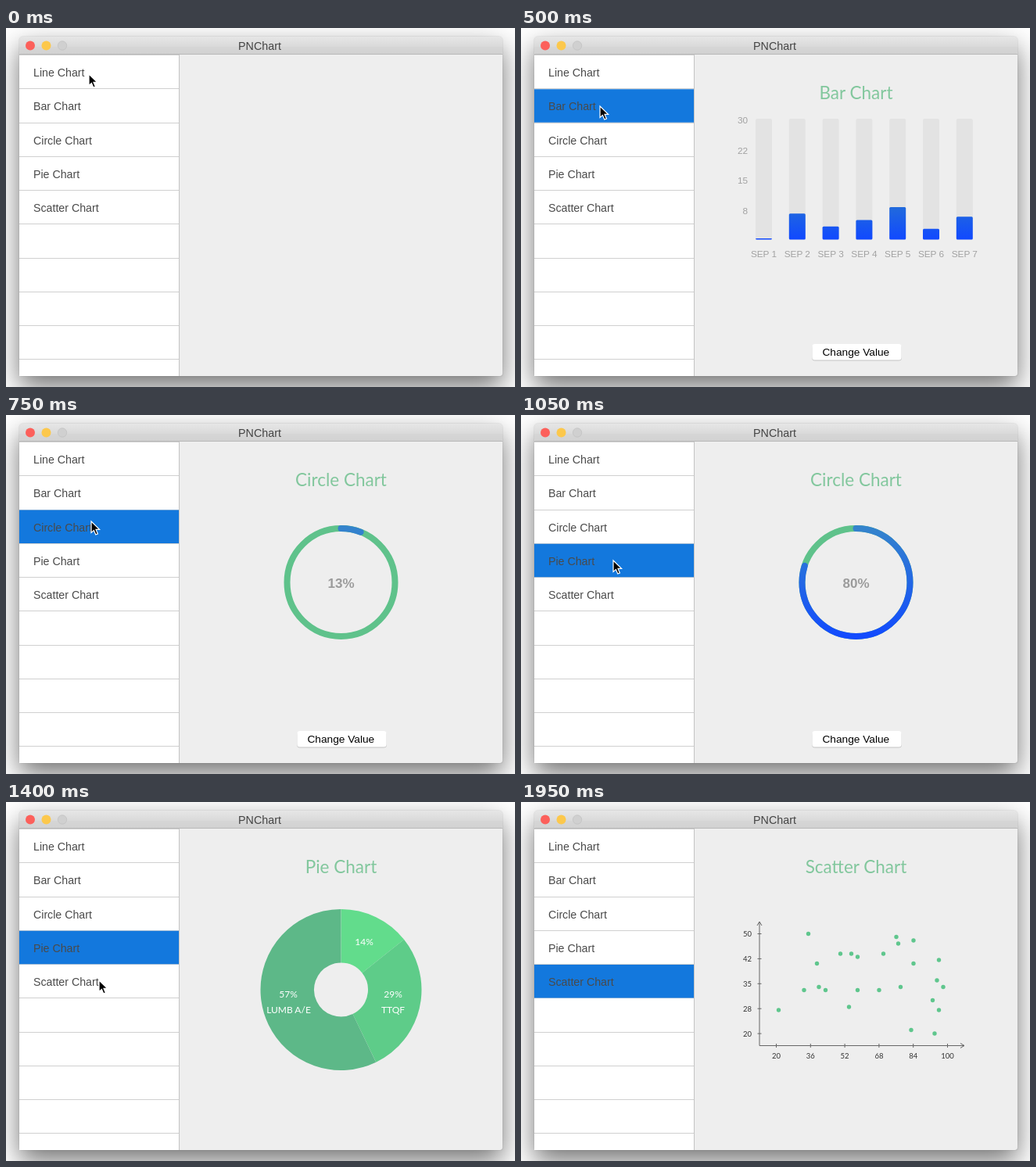
Write an HTML page that moves like this. It is 651x459 px and loops after 2000 ms.

```html
<!DOCTYPE html>
<html lang="en">
<head>
<meta charset="utf-8">
<title>PNChart</title>
<style>
  html, body { margin: 0; width: 100%; height: 100%; overflow: hidden; background: #fff; }
  #window {
    position: absolute; left: 17px; top: 11px; width: 618px; height: 434px;
    border-radius: 5px 5px 3px 3px; background: #eee;
    box-shadow: 0 0 1px rgba(0,0,0,.5), 0 14px 34px rgba(0,0,0,.55);
  }
  svg { position: absolute; left: 0; top: 0; }
  text { font-family: "Liberation Sans", Arial, sans-serif; }
  .lato, .title { font-family: Lato, sans-serif; }
  .title { font-size: 22.5px; fill: #82c79d; }
  .row { font-size: 14.2px; fill: #4a4a4a; }
  .bold { font-size: 10.9px; stroke: #000; stroke-width: .3; }
  .pale { font-size: 11.8px; fill: #a2a2a2; }
  .tiny { font-size: 9.5px; fill: #333; }
  .pie { font-size: 12px; fill: #fff; }
  .axis { fill: none; stroke: #666; }
</style>
</head>
<body>
<div id="window"></div>
<svg id="stage" width="651" height="459" viewBox="0 0 651 459"></svg>
<script>
const NAMES = ['Line', 'Bar', 'Circle', 'Pie', 'Scatter'];
const ROW = 43.25, MID = 428.5;
const SELECT = [50, 400, 600, 1050, 1550];   // row clicks; each chart follows 50 ms later
const BARS = [1, 24, 12, 18, 30, 10, 21];
const SERIES = [
  { color: '#c9dfd3', data: [60.1, 160.1, 126.4, 262.2, 186.2, 127.2, 176.2] },
  { color: '#7ccbf0', data: [20.1, 180.1, 26.4, 202.2, 126.2, 167.2, 276.2] }
];
const DOTS = [
  [329.5, 266], [362, 240.5], [367.5, 168.5], [378.5, 206.5], [381, 236.5], [389.5, 240.5],
  [408.5, 194], [419.5, 262], [422.5, 194], [430.5, 198], [430.5, 240.5], [458, 240.5],
  [463.5, 194], [480, 172.5], [482.5, 181], [485.5, 236.5], [502, 177], [502, 206.5],
  [499, 291.5], [526.5, 253.5], [529, 296], [532, 228], [534.5, 202], [534.5, 266], [540, 236.5]
];
const POINTER = [   // time, x, y
  [0, 106, 59], [50, 92, 54], [200, 82, 52], [300, 88, 65], [400, 98, 93], [500, 101, 100],
  [600, 107, 130], [750, 109, 136], [900, 111, 145], [1050, 118, 186], [1250, 119, 200],
  [1400, 119, 228], [1550, 115, 230], [1750, 112, 230]
];

const $ = id => document.getElementById(id);
const clamp = v => Math.max(0, Math.min(1, v));
const ease = p => p * p * (3 - 2 * p);
const phase = (t, start, length) => clamp((t - start) / length);
const repeat = (n, f) => Array.from({ length: n }, (_, i) => f(i)).join('');
const text = (x, y, s, cls, anchor = 'middle', more = '') =>
  `<text x="${x}" y="${y}" class="${cls}" text-anchor="${anchor}" ${more}>${s}</text>`;
const rect = (x, y, w, h, fill, more = '') =>
  `<rect x="${x}" y="${y}" width="${w}" height="${h}" fill="${fill}" ${more}/>`;
const circle = (x, y, r, fill, more = '') =>
  `<circle cx="${x}" cy="${y}" r="${r}" fill="${fill}" ${more}/>`;
const path = (d, more) => `<path d="${d}" ${more}/>`;
const axes = (x, y, top, right) => path(
  `M${x - 3} ${top + 5}L${x} ${top}L${x + 3} ${top + 5}M${x} ${top}V${y}H${right}` +
  `M${right - 5} ${y - 3}L${right} ${y}L${right - 5} ${y + 3}`, 'class="axis"');

function frame() {
  return rect(17, 11, 618, 23, 'url(#bar)', 'rx="4"') +
    rect(17, 24, 618, 10, '#d4d4d4', 'opacity=".5"') + rect(17, 33, 618, 1, '#b8b8b8') +
    circle(31, 22.5, 6, '#fc605b') + circle(51.5, 22.5, 6, '#fcc84c') +
    circle(72, 22.5, 5.7, '#d0d0d0', 'stroke="#bfbfbf" stroke-width=".7"') +
    text(324.5, 27.7, 'PNChart', '', 'middle', 'font-size="14.3" fill="#444"') +
    rect(17, 34, 205, 411, '#fff') + rect(221, 34, 1, 411, '#c4c4c4') +
    repeat(10, i => rect(17, Math.round(34 + ROW * i), 204, 1, '#d0d0d0')) +
    `<g id="mark">${rect(17, 35, 204, 42.5, '#1378dd')}</g>` +
    NAMES.map((n, i) => text(35, 62 + ROW * i, n + ' Chart', 'row', 'start')).join('');
}

const px = i => 325.5 + 41.2 * i, py = v => 277.2 - .2485 * v;

function lineChart() {
  const marker = (s, x, y) => s
    ? `M${x - 4} ${y + 4}h8v-8h-8z` : `M${x - 4} ${y - 3.5}h8l-4 7z`;
  const series = ({ color, data }, s) => {
    let d = '';
    for (let i = 0; i < 6; i++) {
      const dx = 41.2, dy = py(data[i + 1]) - py(data[i]), k = 4.5 / Math.hypot(dx, dy);
      d += `M${px(i) + dx * k} ${py(data[i]) + dy * k}` +
        `L${px(i + 1) - dx * k} ${py(data[i + 1]) - dy * k}`;
    }
    const look = `fill="none" stroke="${color}" stroke-width="2" pathLength="1"`;
    return path(d, look + ' class="trace"') +
      data.map((v, i) => path(marker(s, px(i), py(v)), look + ` class="spot" data-i="${i}"`)).join('');
  };
  return axes(294.5, 301.5, 138, 593) +
    path(repeat(6, i => `M294.5 ${153.5 + 24.7 * i}h2.5`) + repeat(7, i => `M${px(i)} 301.5v-2.5`),
      'class="axis"') +
    text(302.5, 149, 'y', '', 'middle', 'font-size="11.5" fill="#333"') +
    text(590, 292, 'x', '', 'middle', 'font-size="11.5" fill="#333"') +
    ['500.0', '400.2', '300.4', '200.6', '100.8', '1.0']
      .map((s, i) => text(282, 157.5 + 24.7 * i, s, 'bold', 'end')).join('') +
    repeat(7, i => text(px(i), 317.5, 'SEP ' + (i + 1), 'bold')) +
    SERIES.map(series).join('');
}

function barChart() {
  const x = i => 300 + 42.8 * i;
  return [30, 22, 15, 8].map((n, i) => text(290, 122 + 38.6 * i, n, 'pale', 'end')).join('') +
    repeat(7, i => rect(x(i), 116, 21, 154.5, '#e3e3e3', 'rx="2"') +
      text(x(i) + 10.5, 292.5, 'SEP ' + (i + 1), 'pale')) +
    BARS.map((v, i) => rect(x(i), 270, 21, 0, 'url(#deep)', 'class="fill" rx="1.5"')).join('');
}

function circleChart() {
  const ring = `fill="none" stroke-width="8"`;
  return `<circle cx="${MID}" cy="214" r="69" ${ring} stroke="#5fc28b"/>` +
    path(`M${MID} 145a69 69 0 0 1 0 138a69 69 0 0 1 0 -138`,
      ring + ' id="arc" stroke="url(#blue)" stroke-linecap="round" pathLength="1"') +
    text(MID, 221, '', '', 'middle', 'id="percent" font-size="17" font-weight="bold" fill="#9b9b9b"');
}

function pieChart() {
  const ring = (from, part, color) =>
    `<circle cx="${MID}" cy="240" r="68.75" fill="none" stroke="${color}" stroke-width="68.5"
      pathLength="1" transform="rotate(${from * 360 - 90} ${MID} 240)"
      class="slice" data-from="${from}" data-part="${part}"/>`;
  const label = (x, y, s) => text(x, y, s, 'pie lato');
  return ring(0, 1 / 7, '#62dc8c') + ring(1 / 7, 2 / 7, '#5ecc89') + ring(3 / 7, 4 / 7, '#5db888') +
    `<g id="labels">` + label(458, 183, '14%') + label(495, 250, '29%') + label(495, 270, 'TTQF') +
    label(361, 250, '57%') + label(361.5, 270, 'LUMB A/E') + '</g>';
}

function scatterChart() {
  const tx = i => 326.5 + 43.8 * i, ty = i => 168.5 + 31.9 * i;
  return axes(305, 311.5, 153, 567) +
    path(repeat(5, i => `M302.5 ${ty(i)}h5`) + repeat(6, i => `M${tx(i)} 309v5`), 'class="axis"') +
    [50, 42, 35, 28, 20].map((n, i) => text(295, ty(i) + 3.5, n, 'tiny lato', 'end')).join('') +
    [20, 36, 52, 68, 84, 100].map((n, i) => text(tx(i), 328.3, n, 'tiny lato')).join('') +
    `<g id="dots">${DOTS.map(([x, y]) => circle(x, y, 2.7, '#5fc68d')).join('')}</g>`;
}

const gradient = (id, y1, y2, a, b) =>
  `<linearGradient id="${id}" gradientUnits="userSpaceOnUse" x1="0" x2="0" y1="${y1}" y2="${y2}">
    <stop stop-color="${a}"/><stop offset="1" stop-color="${b}"/></linearGradient>`;

$('stage').innerHTML =
  gradient('bar', 11, 34, '#e6e6e6', '#d0d0d0') +
  gradient('deep', 116, 270, '#4dc47a', '#1149ff') +
  gradient('blue', 141, 287, '#3585cb', '#1149ff') +
  frame() +
  [lineChart, barChart, circleChart, pieChart, scatterChart].map((draw, i) =>
    `<g class="chart">${text(MID, 91, NAMES[i] + ' Chart', 'title')}${draw()}</g>`).join('') +
  `<g id="button">${rect(372, 405, 115, 20.5, '#c4c4c4', 'rx="4"')}` +
  rect(372.3, 404, 114.4, 20.5, '#fff', 'rx="3.5"') +
  text(428.3, 419, 'Change Value', '', 'middle', 'font-size="13.7"') + '</g>' +
  path('M0 0V14.5L3.4 11.4L5.8 17L8.4 15.9L6 10.4H10.6Z',
    'id="pointer" stroke="#fff" stroke-width="1.2"');

const all = s => [...document.querySelectorAll(s)];
const charts = all('.chart'), traces = all('.trace'), spots = all('.spot');
const fills = all('.fill'), slices = all('.slice');
const show = (el, on) => el.setAttribute('visibility', on ? 'visible' : 'hidden');
const reveal = (el, p) => {
  el.setAttribute('stroke-dasharray', p >= 1 ? 'none' : `${p} 2`);
  el.style.display = p > 0 ? '' : 'none';
};

function movePointer(t) {
  const n = POINTER.findIndex(k => k[0] > t);
  show($('pointer'), n > 0);
  if (n < 1) return;
  const [t0, x0, y0] = POINTER[n - 1], [t1, x1, y1] = POINTER[n];
  const p = (t - t0) / (t1 - t0);
  $('pointer').setAttribute('transform', `translate(${x0 + (x1 - x0) * p} ${y0 + (y1 - y0) * p})`);
}

function render(t) {
  const last = time => SELECT.filter(s => s <= time).length - 1;
  const row = last(t), chart = last(t - 50);
  show($('mark'), row >= 0);
  $('mark').setAttribute('transform', `translate(0 ${ROW * row})`);
  charts.forEach((c, i) => { c.style.display = i === chart ? '' : 'none'; });
  show($('button'), chart >= 0 && chart < 3);
  movePointer(t);

  const line = ease(phase(t, 75, 200));
  traces.forEach(el => reveal(el, line));
  spots.forEach(el => reveal(el, clamp(7 * line ** 1.3 - el.dataset.i)));

  const grow = ease(phase(t, 425, 220));
  fills.forEach((el, i) => {
    const h = 154.5 * grow * BARS[i] / 30;
    el.setAttribute('y', 270.5 - h);
    el.setAttribute('height', h);
  });

  const turn = phase(t, 700, 300);
  reveal($('arc'), .8 * ease(turn));
  $('percent').textContent = Math.floor(80 * turn) + '%';

  const sweep = ease(phase(t, 1080, 260));
  slices.forEach(el => {
    const { from, part } = el.dataset;
    el.setAttribute('stroke-dasharray', `${Math.max(0, Math.min(+part, sweep - from))} 2`);
  });
  $('labels').setAttribute('opacity', phase(t, 1300, 100));
  $('dots').setAttribute('opacity', phase(t, 1600, 300));
}

function tick() {
  render(Math.floor(performance.now() % 2000 / 50) * 50);
  requestAnimationFrame(tick);
}
tick();
</script>
</body>
</html>
```
